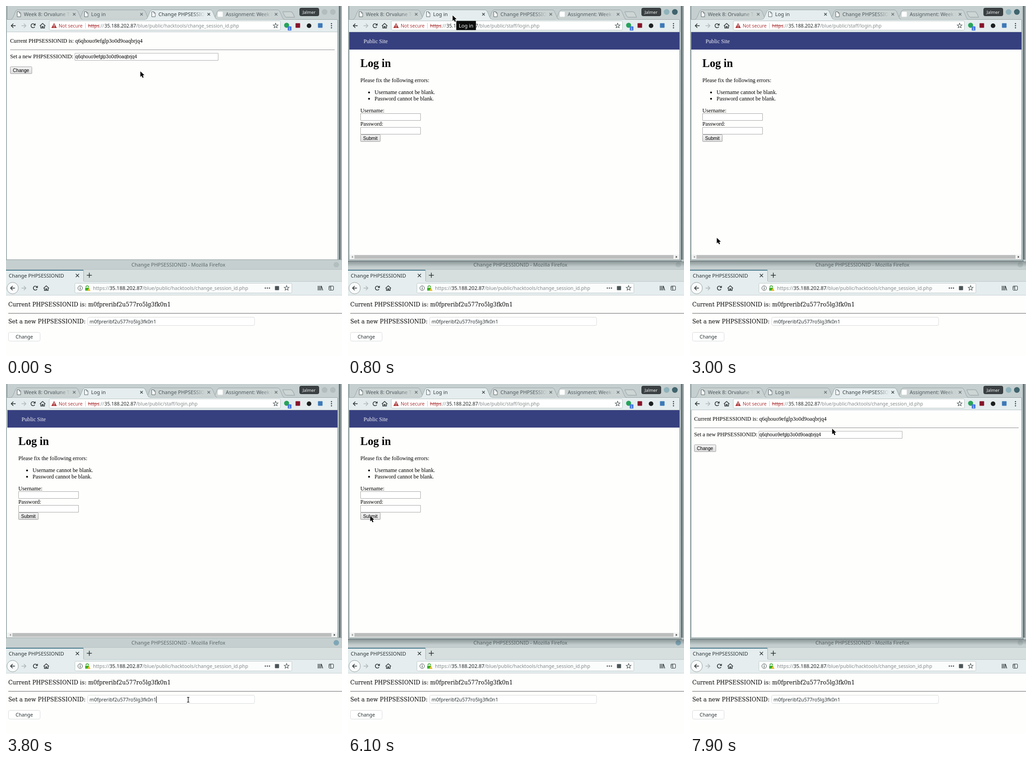
These frames come from a looping animation (734x763 px, 8000 ms). An HTML page with a canvas:

```html
<!DOCTYPE html>
<html lang="en">
<head>
<meta charset="utf-8">
<title>Session ID demo</title>
<style>
html, body { margin: 0; width: 100%; height: 100%; overflow: hidden; background: #fff; }
canvas { display: block; }
</style>
</head>
<body>
<canvas id="stage" width="734" height="763"></canvas>
<script>
const c = document.getElementById('stage').getContext('2d');
const LOOP = 8000, STEP = 100;
const UI = '"Noto Sans", "Open Sans", sans-serif';
const TIMES = '"Liberation Serif", serif';
const ARIAL = '"Liberation Sans", sans-serif';
const SERIF = '"DejaVu Serif", serif';
const INK = '#2b3335', BAR = '#c5cfcf', TOOL = '#e5edee', PAGE = '#fefefd';

// Pointer waypoints: time, x, y
const PATH = [
  [0, 293, 142], [100, 293, 142], [300, 232, 46], [400, 198, 18], [500, 228, 20],
  [1300, 228, 20], [2000, 43, 284], [2200, 43, 284], [2500, 235, 14],
  [2900, 6, 420], [3100, 110, 590], [3500, 398, 688], [5000, 398, 688],
  [5100, 0, 69], [5900, 48, 287], [6800, 48, 287], [7200, 380, 17],
  [7600, 380, 17], [7900, 310, 97], [8000, 310, 97]
];

function pointer(t) {
  const i = Math.max(1, PATH.findIndex(k => k[0] > t));
  const [t0, x0, y0] = PATH[i - 1], [t1, x1, y1] = PATH[i];
  const u = (t - t0) / (t1 - t0), e = u * u * (3 - 2 * u);
  return [Math.round(x0 + (x1 - x0) * e), Math.round(y0 + (y1 - y0) * e)];
}

function rect(x, y, w, h, fill) {
  c.fillStyle = fill;
  c.fillRect(x, y, w, h);
}
function fade(x0, y0, x1, y1, from, to) {
  const g = c.createLinearGradient(x0, y0, x1, y1);
  g.addColorStop(0, from);
  g.addColorStop(1, to);
  return g;
}
function box(x, y, w, h, r, fill, stroke) {
  c.beginPath();
  c.roundRect(x + .5, y + .5, w - 1, h - 1, r);
  c.fillStyle = fill;
  c.fill();
  if (stroke) { c.strokeStyle = stroke; c.lineWidth = 1; c.stroke(); }
}
function dot(x, y, r, fill) {
  c.beginPath();
  c.arc(x, y, r, 0, 7);
  c.fillStyle = fill;
  c.fill();
}
function ring(x, y, r, color, w = 1) {
  c.beginPath();
  c.arc(x, y, r, 0, 7);
  c.strokeStyle = color;
  c.lineWidth = w;
  c.stroke();
}
function line(color, w, ...p) {
  c.beginPath();
  for (let i = 0; i < p.length; i += 2) c.lineTo(p[i], p[i + 1]);
  c.strokeStyle = color;
  c.lineWidth = w;
  c.stroke();
}
function poly(fill, ...p) {
  c.beginPath();
  for (let i = 0; i < p.length; i += 2) c.lineTo(p[i], p[i + 1]);
  c.closePath();
  c.fillStyle = fill;
  c.fill();
}
function text(s, x, y, size, family = UI, fill = INK, weight = '') {
  c.font = `${weight} ${size}px ${family}`;
  c.fillStyle = fill;
  c.fillText(s, x, y);
}

function arrow(x, y, dir, color) {
  line(color, 1.6, x - 5 * dir, y, x + 4 * dir, y);
  line(color, 1.6, x, y - 4.5, x + 4.5 * dir, y, x, y + 4.5);
}
function reload(x, y) {
  c.beginPath();
  c.arc(x, y, 4.3, .5, 5.5);
  c.strokeStyle = INK;
  c.lineWidth = 1.6;
  c.stroke();
  poly(INK, x + 5.5, y - 5.5, x + 5.5, y - .5, x + .5, y - .5);
}
function home(x, y) {
  line(INK, 1.5, x - 6, y + .5, x, y - 5, x + 6, y + .5);
  line(INK, 1.5, x - 4, y, x - 4, y + 5, x - 1, y + 5, x - 1, y + 1.5,
    x + 1, y + 1.5, x + 1, y + 5, x + 4, y + 5, x + 4, y);
}
function star(x, y) {
  c.beginPath();
  for (let i = 0; i < 10; i++) {
    const a = -Math.PI / 2 + i * Math.PI / 5, r = i % 2 ? 2.4 : 5.5;
    c.lineTo(x + r * Math.cos(a), y + r * Math.sin(a));
  }
  c.closePath();
  c.strokeStyle = '#4d5658';
  c.lineWidth = 1.1;
  c.stroke();
}
function cross(x, y, r, color) {
  line(color, 1.3, x - r, y - r, x + r, y + r);
  line(color, 1.3, x + r, y - r, x - r, y + r);
}
function docIcon(x, y) {
  poly('#fbfcfc', x, y, x + 5, y, x + 8, y + 3, x + 8, y + 11, x, y + 11);
  line('#59666a', 1, x + .5, y + .5, x + 5, y + .5, x + 8, y + 3.5, x + 8, y + 11.5, x + .5, y + 11.5, x + .5, y);
  line('#59666a', 1, x + 5, y, x + 5, y + 3.5, x + 8, y + 3.5);
}

const TABS = ['Week 8: Orvalune Tasks', 'Log in', 'Change PHPSESSIONID', 'Assignment: Week 8'];

function tab(i, active) {
  const x = 11 + 147 * i, r = x + 156;
  c.beginPath();
  c.moveTo(x, 29.5);
  c.bezierCurveTo(x + 6, 28, x + 8, 8.5, x + 14, 8.5);
  c.lineTo(r - 14, 8.5);
  c.bezierCurveTo(r - 8, 8.5, r - 6, 28, r, 29.5);
  c.fillStyle = active ? TOOL : '#cbd3d3';
  c.fill();
  c.strokeStyle = '#98a3a4';
  c.lineWidth = 1;
  c.stroke();
  if (active) rect(x, 29, 156, 2, TOOL);
  if (i < 3) docIcon(x + 13, 12);
  else box(462, 12, 12, 12, 1, '#fff');
  const tone = active ? '51,60,63' : '78,88,91';
  text(TABS[i], x + 28, 22, 11.05, UI, fade(x + 104, 0, x + 130, 0, `rgba(${tone},1)`, `rgba(${tone},0)`));
  cross(x + 138, 18, 2.8, active ? '#3c4649' : '#667174');
}

function button(label, x, y, w, h, tx) {
  box(x, y, w, h, 1, fade(0, y, 0, y + h, '#f4f4f4', '#dcdcdc'), '#a0a0a0');
  text(label, tx, y + 11.7, 10.13, ARIAL, '#000');
}

function sessionPage() {
  text('Current PHPSESSIONID is: q6qhouo9efglp3o0d9oaqbrjq4', 9, 80, 12.16, TIMES, '#000');
  rect(9, 95, 709, 1, '#8d8d8d');
  text('Set a new PHPSESSIONID:', 9, 114, 12.16, TIMES, '#000');
  box(150, 102.5, 314, 16.5, 0, '#fff', '#adadad');
  text('q6qhouo9efglp3o0d9oaqbrjq4', 151.5, 114, 10.13, ARIAL, '#000');
  button('Change', 9, 132, 48, 16, 15);
}

function loginPage() {
  const say = (s, x, y) => text(s, x, y, 12.16, TIMES, '#000');
  rect(3, 57, 721, 38, '#37407f');
  text('Public Site', 34, 80.5, 12.16, TIMES, '#f1f1f5');
  text('Log in', 27, 133, 24.32, TIMES, '#000', 'bold');
  say('Please fix the following errors:', 27, 166);
  ['Username', 'Password'].forEach((s, i) => {
    dot(46, 188.5 + 13.7 * i, 2, '#000');
    say(s + ' cannot be blank.', 58, 192 + 13.7 * i);
    say(s + ':', 27, 231.5 + 29.7 * i);
    box(27, 234 + 30 * i, 132, 16, 0, '#fff', '#a9a9a9');
  });
  button('Submit', 27, 280, 44, 16, 33);
  rect(3, 542, 721, 10, '#f0f1f1');
  rect(14, 543, 697, 8, '#bcbdbd');
  poly('#9b9b9b', 11, 544.5, 11, 549.5, 7.5, 547);
  poly('#4b4b4b', 716, 544.5, 716, 549.5, 719.5, 547);
}

function chrome(login, focus) {
  const end = focus ? 556 : 553;
  rect(0, 0, 728, end, BAR);
  rect(0, 0, 2, end, '#a9b6b7');
  rect(2, 0, 1, end, '#84908f');
  rect(2, 30, 722, 27, TOOL);
  rect(2, 29, 722, 1, '#98a3a4');
  const on = login ? 1 : 2;
  for (const i of [3, 2, 1, 0]) if (i !== on) tab(i, false);
  tab(on, true);
  c.beginPath();
  c.moveTo(604.5, 12.5);
  c.lineTo(623, 12.5);
  c.quadraticCurveTo(626, 13, 630.5, 24.5);
  c.lineTo(612, 24.5);
  c.quadraticCurveTo(609, 24, 604.5, 12.5);
  c.fillStyle = '#cdd5d5';
  c.fill();
  c.strokeStyle = '#a2adad';
  c.stroke();

  box(641, 4, 43, 18, 3, '#3b4143', '#2f3537');
  text('Jalmer', 648, 16.5, 9.4, UI, '#f2f4f4');
  dot(696, 13, 6.2, focus ? '#90b3bc' : '#b3bdbd');
  dot(714, 13, 6.2, focus ? '#40646e' : '#b3bdbd');

  arrow(16, 43, -1, INK);
  arrow(39, 43, 1, '#b2babb');
  reload(59, 43);
  home(80, 43);
  box(94, 32, 506, 21, 2, '#fff', '#b9c3c4');
  poly('#b03a3c', 105, 37, 111, 48, 99, 48);
  rect(104.4, 40.5, 1.3, 4, '#fff');
  rect(104.4, 45.5, 1.3, 1.3, '#fff');
  text('Not secure', 115, 46.5, 10.3, UI, '#b03a3c');
  rect(173, 37, 1, 12, '#c7cccc');
  text('https', 179, 46.5, 10.35, UI, '#b03a3c');
  rect(179, 42.5, 24, 1, '#b03a3c');
  text('://', 204, 46.5, 10.35, UI, '#858b8c');
  text('35.188.202.87', 215, 46.5, 10.6, UI, '#202526');
  text(login ? '/blue/public/staff/login.php' : '/blue/public/hacktools/change_session_id.php',
    284, 46.5, 10.38, UI, '#858b8c');
  star(589, 43);
  dot(613, 42, 5.5, '#27a35a');
  box(615, 44, 9, 10, 1, '#3f74dd');
  text('1', 617.3, 52, 7.5, ARIAL, '#fff');
  box(632, 37, 11, 11, 1, '#86142a');
  dot(662, 43, 5, '#1d2021');
  box(681, 37, 11, 11, 1, '#3d79b8');
  for (const y of [38.5, 43, 47.5]) dot(711, y, 1.3, INK);

  const left = focus ? 3 : 2;
  rect(left, 57, 724 - left, 496, PAGE);
  rect(2, 56, 722, 1, '#bfc8c9');
  if (login) loginPage(); else sessionPage();
  rect(724, 30, 1, end - 30, '#8b9798');
  rect(725, 0, 2, end, '#bcc8c9');
  rect(727, 0, 1, end, '#7c898b');
  if (focus) {
    rect(0, 553, 727, 3, '#bcc8c9');
    rect(0, 552.5, 726, 1, '#8b9798');
    rect(0, 555.5, 729, 1.2, '#57676a');
    rect(0, 556.7, 734, 13, fade(0, 556, 0, 569, 'rgba(50,62,65,.42)', 'rgba(50,62,65,0)'));
  }
}

function firefox(raised, lit, caret) {
  rect(0, 553, 734, 22, BAR);
  if (raised) rect(0, 552.5, 734, 1, '#8d999a');
  text('Change PHPSESSIONID - Mozilla Firefox', 274, 568, 11.06, UI, '#5c676a');
  dot(721.5, 564, 6, lit ? '#7fa6b6' : '#b3bebf');
  rect(0, 575, 734, 26, '#d6dede');
  rect(0, 574, 734, 1, '#b8c2c3');
  rect(0, 575, 169, 26, TOOL);
  rect(0, 575, 169, 2, '#4f8093');
  rect(169, 576, 1, 24, '#aab5b6');
  text('Change PHPSESSIONID', 6, 591.5, 11.03);
  cross(156, 587.5, 3.5, INK);
  line(INK, 1.5, 176.5, 587, 187.5, 587);
  line(INK, 1.5, 182, 581.5, 182, 592.5);
  rect(0, 600, 734, 31, TOOL);
  rect(170, 600, 564, 1, '#bfc9c9');

  dot(14.5, 615, 12.5, '#f9fbfb');
  ring(14.5, 615, 12.5, '#929d9f');
  arrow(14.5, 615, -1, INK);
  arrow(39, 615, 1, '#b0b8b9');
  reload(64, 615);
  home(88, 615);
  box(150, 604, 475, 22, 2, '#fbfcfc', '#c3cccc');
  ring(162, 615, 5, '#4b5456');
  rect(161.4, 614, 1.3, 4, '#4b5456');
  rect(161.4, 612, 1.3, 1.3, '#4b5456');
  c.beginPath();
  c.arc(177.5, 613, 3, Math.PI, 0);
  c.strokeStyle = '#35a329';
  c.lineWidth = 1.6;
  c.stroke();
  rect(173, 614, 9, 6.5, '#35b32a');
  poly('#e8b92e', 181, 614, 184.5, 621, 177.5, 621);
  text('https://', 190, 619, 10.5, UI, '#858b8c');
  text('35.188.202.87', 226, 619, 11.05, UI, '#1e2324');
  text('/blue/public/hacktools/change_session_id.php', 298, 619, 10.65, UI, '#858b8c');
  for (const x of [566.5, 571, 575.5]) dot(x, 615, 1.4, '#4b5456');
  box(587, 610, 10, 10, 1, '#4b5456');
  star(613, 615);
  for (const x of [682, 685, 688]) line(INK, 1.4, x, 610, x, 620);
  line(INK, 1.4, 689, 610.5, 692, 620);
  box(705, 610, 11, 10, 1.5, TOOL, INK);
  rect(709, 610, 1, 10, INK);
  rect(706.5, 612, 2, 1, INK);
  rect(706.5, 614.5, 2, 1, INK);

  rect(0, 631, 734, 132, PAGE);
  rect(0, 630, 734, 1, '#cbd1d1');
  text('Current PHPSESSIONID is: m0fpreribf2u577ro5lg3fk0n1', 5, 654.5, 12.14, SERIF, '#000');
  rect(5, 669.5, 729, 1, '#5f5f5f');
  text('Set a new PHPSESSIONID:', 5, 691.5, 12.14, SERIF, '#000');
  box(178, 678, 365.5, 19, 3, '#fff', '#d8dbdb');
  text('m0fpreribf2u577ro5lg3fk0n1', 182.5, 691.5, 10.7);
  if (caret) rect(328, 681, 1, 14, '#000');
  box(5, 711, 70, 20, 3, '#fff', '#d8dbdb');
  text('Change', 21, 725, 10.55);
}

function tooltip() {
  box(236, 32, 44, 21, 1, '#0b0c0c');
  text('Log in', 242, 46.5, 11, UI, '#f4f4f4');
}

function drawPointer(x, y, beam) {
  c.save();
  c.translate(x, y);
  if (beam) {
    rect(-3.5, -6.5, 7, 3, '#fff');
    rect(-1.5, -6, 3, 12, '#fff');
    rect(-3.5, 4, 7, 3, '#fff');
    rect(-.5, -5, 1.2, 11, '#000');
    rect(-2.5, -5.5, 5, 1.2, '#000');
    rect(-2.5, 5, 5, 1.2, '#000');
  } else {
    c.scale(1.08, 1.08);
    c.beginPath();
    for (const [px, py] of [[.5, .5], [.5, 11.5], [3, 9.2], [5, 13.5], [7, 12.6], [5.2, 8.4], [8.6, 8.2]]) c.lineTo(px, py);
    c.closePath();
    c.lineJoin = 'round';
    c.strokeStyle = '#fff';
    c.lineWidth = 1.6;
    c.stroke();
    c.fillStyle = '#000';
    c.fill();
  }
  c.restore();
}

function draw(now) {
  const t = Math.floor((now % LOOP) / STEP) * STEP;
  const during = (a, b) => t >= a && t < b;
  const login = during(800, 7200);
  const focus = during(700, 3600) || t >= 6100;
  rect(0, 0, 734, 763, BAR);
  rect(728, 0, 6, 556, fade(728, 0, 734, 0, '#4f5c5f', '#c3cbcc'));
  const back = () => chrome(login, focus);
  const front = () => firefox(!focus, during(3600, 6300), during(3700, 5000));
  if (focus) { front(); back(); } else { back(); front(); }
  if (during(700, 900)) tooltip();
  if (!during(5000, 5200)) {
    const [x, y] = pointer(t);
    drawPointer(x, y, during(3500, 4900));
  }
}

const start = performance.now();
function tick() {
  draw(performance.now() - start);
  requestAnimationFrame(tick);
}
tick();
</script>
</body>
</html>
```
